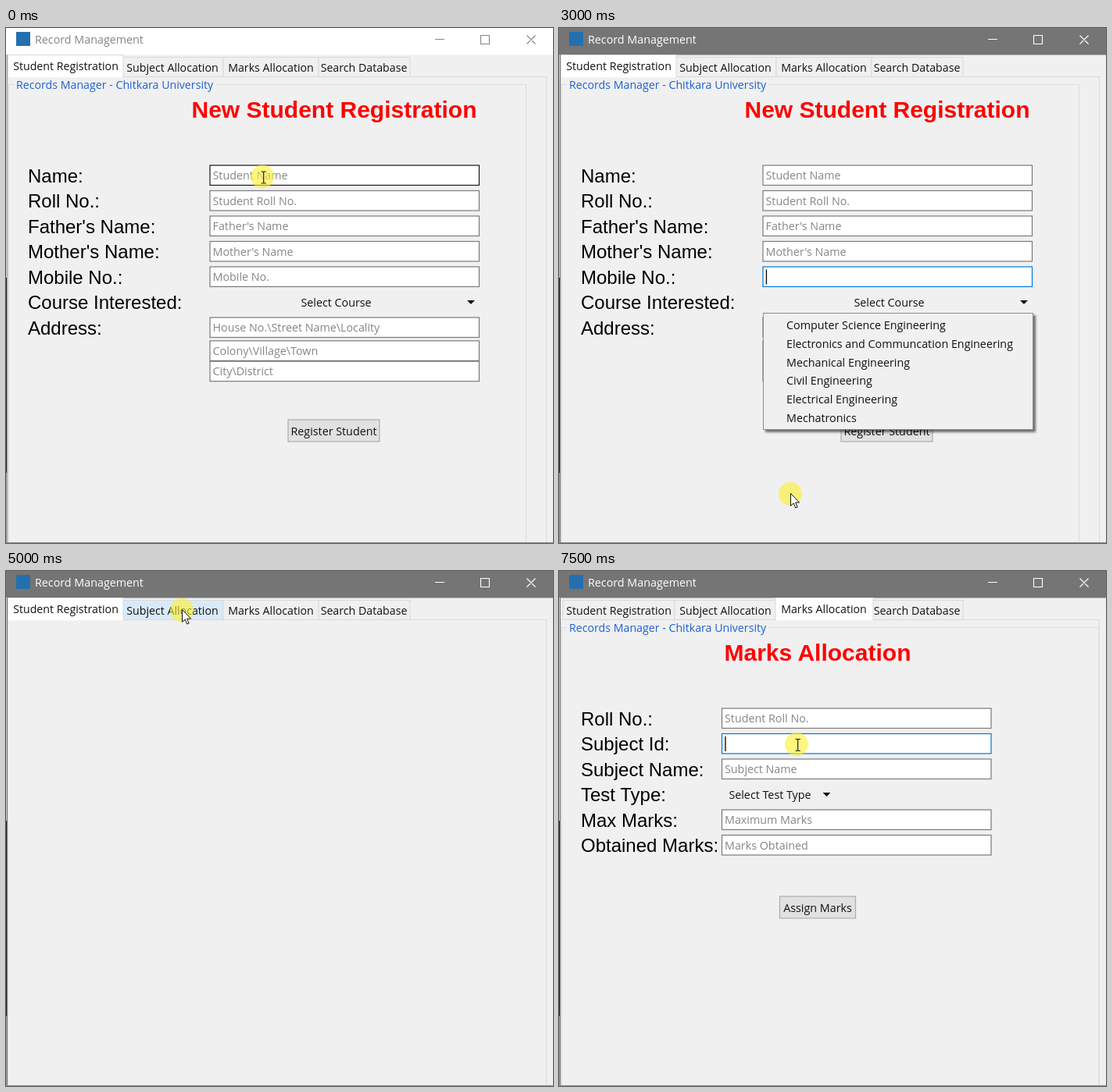
Animation, 700 px wide and 660 px high, one loop 8 s. Source, as an HTML page:

```html
<!DOCTYPE html>
<html lang="en">
<head>
<meta charset="utf-8">
<title>Record Management</title>
<style>
  html, body { margin: 0; width: 100%; height: 100%; overflow: hidden; background: #f0f0f0; }
  svg { display: block; }
  text { font: 14.2px "Open Sans", "Noto Sans", sans-serif; fill: #111; white-space: pre; }
  .title { font-size: 14.3px; }
  .hint { font-size: 14.3px; fill: #868686; }
  .item { font-size: 14.3px; }
  .mid { text-anchor: middle; }
  .label { font: 24px "Liberation Sans", Arial, sans-serif; fill: #000; }
  .head { font: bold 30px "Liberation Sans", Arial, sans-serif; fill: #f00; text-anchor: middle; }
  .group { fill: #1f60d2; }
  .menu { filter: drop-shadow(3px 3px 1.5px rgba(0, 0, 0, .55)); }
</style>
</head>
<body>
<svg id="stage" width="700" height="660" viewBox="0 0 700 660"></svg>
<script>
const STEP = 500, ROW = 32.5;
const stage = document.getElementById('stage');

const rect = (x, y, w, h, fill, stroke = 'none', sw = 1) =>
  `<rect x="${x}" y="${y}" width="${w}" height="${h}" fill="${fill}" stroke="${stroke}" stroke-width="${sw}"/>`;
const path = (d, stroke, sw = 1, fill = 'none') =>
  `<path d="${d}" fill="${fill}" stroke="${stroke}" stroke-width="${sw}"/>`;
const text = (x, y, str, cls = '', fill = '') =>
  `<text x="${x}" y="${y}" class="${cls}"${fill && ` style="fill:${fill}"`}>${str}</text>`;

// Each field is [row, hint]; a row may be fractional.
const pages = [
  {
    head: ['New Student Registration', 420], x: 261, right: 665.5,
    labels: ['Name:', 'Roll No.:', "Father's Name:", "Mother's Name:", 'Mobile No.:', 'Course Interested:', 'Address:'],
    fields: [[0, 'Student Name'], [1, 'Student Roll No.'], [2, "Father's Name"], [3, "Mother's Name"], [4, 'Mobile No.'],
      [6, 'House No.\\Street Name\\Locality'], [6.92, 'Colony\\Village\\Town'], [7.73, 'City\\District']],
    select: ['Select Course', 422.5, 5, 595],
    button: ['Register Student', 361, 502, 117]
  },
  {
    head: ['Subject Allocation', 326], x: 192.3, right: 691,
    labels: ['Roll No.:', 'Subject Id:', 'Subject Name:', 'Credits:'],
    fields: [[0, 'Student Roll No.'], [1, 'Subject ID'], [2, 'Subject Name'], [3, 'No. of Credits']],
    button: ['Allocate Subject', 268.5, 352, 115.5]
  },
  {
    head: ['Marks Allocation', 331], x: 208.5, right: 691,
    labels: ['Roll No.:', 'Subject Id:', 'Subject Name:', 'Test Type:', 'Max Marks:', 'Obtained Marks:'],
    fields: [[0, 'Student Roll No.'], [1, 'Subject ID'], [2, 'Subject Name'], [4, 'Maximum Marks'], [5, 'Marks Obtained']],
    select: ['Select Test Type', 270, 3, 342.5],
    button: ['Assign Marks', 282.5, 417, 97]
  }
];

const tabs = [['Student Registration', 5, 148, 76.5], ['Subject Allocation', 148, 278, 213],
  ['Marks Allocation', 278, 400, 339], ['Search Database', 400, 517, 458]];

const courses = ['Computer Science Engineering', 'Electronics and Communcation Engineering',
  'Mechanical Engineering', 'Civil Engineering', 'Electrical Engineering', 'Mechatronics'];

// One entry per half second; at = pointer position, tab and page carry their own index.
const steps = [
  { tab: 0, page: 0, at: [328, 190.5], hover: 0, idle: true },
  { tab: 0, page: 0, at: [345, 222], focus: [1] },
  { tab: 0, page: 0, at: [356, 249], focus: [2] },
  { tab: 0, page: 0, at: [364, 289], focus: [3] },
  { tab: 0, page: 0, at: [369, 324], focus: [4] },
  { tab: 0, page: 0, at: [376, 361], focus: [4], arrow: true, hot: true },
  { tab: 0, page: 0, at: [296, 597], focus: [4], arrow: true, menu: true },
  { tab: 0, page: 0, at: [306, 421], focus: [4], hover: 6 },
  { tab: 0, page: 0, at: [306, 421], focus: [6] },
  { tab: 0, page: 0, at: [311, 443], focus: [6], hover: 7 },
  { tab: 0, at: [225, 50], arrow: true, hotTab: 1 },
  { tab: 1, page: 1, at: [261, 224], focus: [0, 1] },
  { tab: 1, page: 1, at: [262, 255], focus: [2] },
  { tab: 1, page: 1, at: [259, 295], focus: [3] },
  { tab: 2, at: [335, 51], arrow: true },
  { tab: 2, page: 2, at: [304, 222], focus: [1] }
];

function drawTitle(idle) {
  const ink = idle ? '#858585' : '#fff';
  return rect(0, 0, 700, 34.5, idle ? '#fff' : '#757575') +
    rect(13, 5, 18, 18, '#2470ae') +
    text(37, 20, 'Record Management', 'title', ink) +
    path('M549 14.5h12M607.5 9.5h11v11h-11zM666.5 9.5l11 11m0-11l-11 11', ink, 1.1);
}

function drawEdges(idle) {
  const edge = idle ? '#a5a5a5' : '#777';
  return rect(0, 34, 1, 286, '#d5cccc') + rect(0, 320, 1, 250, '#262626') +
    rect(0, 570, 1, 90, '#a0a0a0') + rect(1, 34, 1, 626, edge) + rect(1, 659, 699, 1, '#8a8a8a');
}

function drawTabs(sel, hot) {
  const draw = ([name, l, r, mid], i) => {
    const on = i === sel;
    const [x, y, end] = on ? [l - (i ? 1 : 2.5), 34.5, r + 2] : [l, 37.5, r];
    const fill = on ? '#fff' : i === hot ? '#d8eaf9' : '#f0f0f0';
    return rect(x, y, end - x, 62.5 - y, fill, '#d9d9d9') +
      (on ? rect(x + .5, 61, end - x - 1, 2.2, '#fff') : '') +
      text(mid, on ? 53.5 : 56, name, 'mid');
  };
  const all = tabs.map(draw);
  const front = all.splice(sel, 1);
  return path('M2.5 660V62.5H691.5V660', '#dcdcdc') + all.join('') + front;
}

function drawField(x, [row, hint], focused, hovered) {
  const y = 176 + row * ROW;
  const ink = focused ? '#0078d7' : hovered ? '#171717' : '#7a7a7a';
  return rect(x, y, 344.5, 25.5, '#fff', ink, 1.2) +
    (focused ? rect(x + 3.8, y + 3.5, 1.3, 19, '#000') : text(x + 3.5, y + 18, hint, 'hint'));
}

function drawSelect([name, mid, row, arrowX], hot) {
  const y = 176 + row * ROW;
  return (hot ? rect(261.5, y - 1.5, 344, 29, '#d8e6f2', '#c0dcf3') : '') +
    text(mid, y + 18, name, 'mid item') +
    path(`M${arrowX - 5} ${y + 10.5}h10l-5 5z`, 'none', 0, '#111');
}

function drawButton([name, x, y, w]) {
  return rect(x, y, w, 28, '#e1e1e1', '#adadad', 1.2) + text(x + w / 2, y + 19.5, name, 'mid item');
}

function drawMenu() {
  return `<g class="menu">${rect(261.5, 365.5, 345, 149, '#f0f0f0', '#8c8c8c')}</g>` +
    courses.map((c, i) => text(291, 386 + i * 23.8, c, 'item')).join('');
}

function drawPage(p, s) {
  const { focus = [], hover } = s;
  return path(`M3.5 660V72.5H10M269 72.5H${p.right}V660`, '#dcdcdc') +
    text(13, 77.5, 'Records Manager - Chitkara University', 'group') +
    text(p.head[1], 115, p.head[0], 'head') +
    p.labels.map((l, i) => text(28, 197.7 + i * ROW, l, 'label')).join('') +
    p.fields.map((f, i) => drawField(p.x, f, focus.includes(i), hover === i)).join('') +
    (p.select ? drawSelect(p.select, s.hot) : '') +
    drawButton(p.button) +
    (s.menu ? drawMenu() : '');
}

function drawPointer([x, y], arrow) {
  const shape = arrow
    ? path(`M${x + .5} ${y - .5}v16l3.7-3.5 2.6 6 2.4-1-2.6-5.9h5z`, '#111', 1, '#fff')
    : path(`M${x - 1.5} ${y - 6.5}h2.4l.8.8.8-.8h2.4M${x + 1.7} ${y - 6}v14M${x - 1.5} ${y + 8.5}h2.4l.8-.8.8.8h2.4`, '#222', 1.2);
  return `<circle cx="${x}" cy="${y}" r="15" fill="#fff02b" opacity=".6"/>` + shape;
}

function draw(s) {
  stage.innerHTML = rect(0, 0, 700, 660, '#f0f0f0') + drawTitle(s.idle) + drawTabs(s.tab, s.hotTab) +
    (s.page === undefined ? '' : drawPage(pages[s.page], s)) +
    drawEdges(s.idle) + drawPointer(s.at, s.arrow);
}

let shown = -1;
const start = performance.now();
function tick() {
  const i = Math.floor((performance.now() - start) / STEP) % steps.length;
  if (i !== shown) draw(steps[shown = i]);
  requestAnimationFrame(tick);
}
tick();
</script>
</body>
</html>
```
